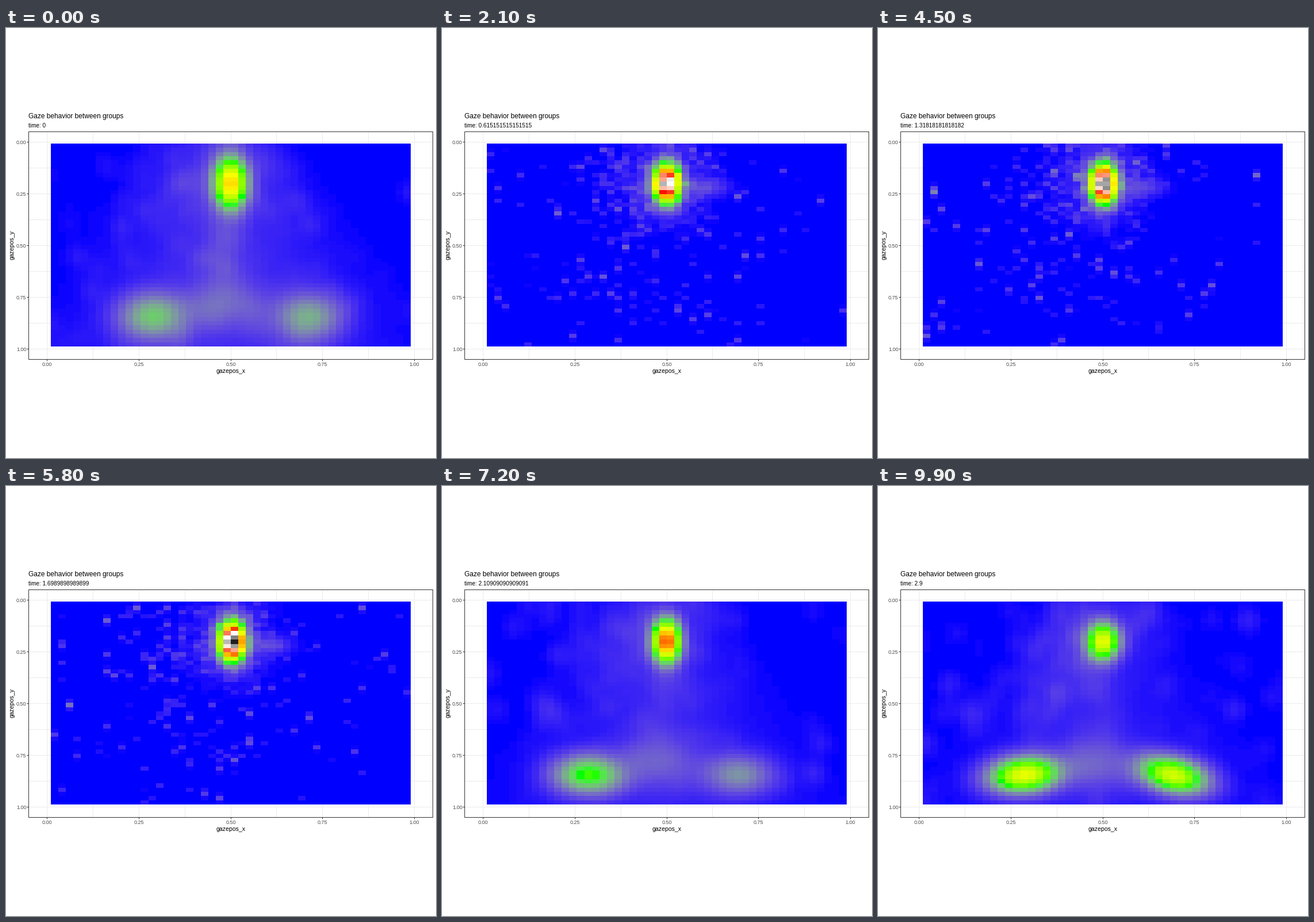
Recreate the animation shown at these times as a matplotlib script. Size 748 by 748 pixels, loop 10000 ms.

```python
import numpy as np
import matplotlib.pyplot as plt
from matplotlib.animation import FuncAnimation
from matplotlib.colors import ListedColormap, to_rgb

SIZE, FRAMES, N = 748, 100, 48
T_END = 2.9
plt.rcParams["font.family"] = "Liberation Sans"

# ---- palette: stops blended in CIE Lab --------------------------------
XYZ = np.array([[.4124564, .3575761, .1804375],
                [.2126729, .7151522, .0721750],
                [.0193339, .1191920, .9503041]])
WHITE = XYZ.sum(axis=1)
STOPS = ["blue", "lime", "yellow", "red", "white", "black"]


def rgb_to_lab(rgb):
    rgb = np.asarray(rgb)
    lin = np.where(rgb > .04045, ((rgb + .055) / 1.055) ** 2.4, rgb / 12.92)
    t = XYZ @ lin / WHITE
    fx, fy, fz = np.where(t > .008856, np.cbrt(t), 7.787 * t + 16 / 116)
    return [116 * fy - 16, 500 * (fx - fy), 200 * (fy - fz)]


def lab_to_rgb(lab):
    fy = (lab[:, 0] + 16) / 116
    f = np.stack([fy + lab[:, 1] / 500, fy, fy - lab[:, 2] / 200], axis=1)
    t = np.where(f > .206893, f ** 3, (f - 16 / 116) / 7.787)
    lin = np.clip((t * WHITE) @ np.linalg.inv(XYZ).T, 0, 1)
    return np.where(lin > .0031308, 1.055 * lin ** (1 / 2.4) - .055, 12.92 * lin)


def heat_map(steps=1024):
    labs = np.array([rgb_to_lab(to_rgb(s)) for s in STOPS])
    x, spots = np.linspace(0, 1, steps), np.linspace(0, 1, len(STOPS))
    ramp = np.stack([np.interp(x, spots, channel) for channel in labs.T], axis=1)
    return ListedColormap(np.clip(lab_to_rgb(ramp), 0, 1))


# ---- gaze density ------------------------------------------------------
rng = np.random.default_rng(12)
idx = np.arange(N)
R, C = np.meshgrid(idx, idx, indexing="ij")
phase = rng.uniform(0, 2 * np.pi, (N, N))


def scatter(n, col, row, gain, start):
    """Short fixations as rows of column, row, strength and moment."""
    power = gain * (.006 + rng.exponential(.016, n))
    return np.stack([np.round(col), np.round(row), power, start * (FRAMES + 10) - 5])


points = np.concatenate([
    scatter(2000, rng.normal(22, 5, 2000), rng.normal(7, 6, 2000), 1,
            rng.uniform(size=2000)),
    scatter(1400, rng.normal(19.5, 6, 1400), rng.normal(27, 12, 1400), 1,
            rng.beta(.6, .6, 1400)),
    scatter(800, N * rng.uniform(size=800) ** 1.25, rng.uniform(0, N, 800), 1.3,
            rng.uniform(size=800)),
], axis=1)
points = points[:, np.all((points[:2] >= 0) & (points[:2] < N), axis=0)]
col, row = points[:2].astype(int)
power, start = points[2:]


def ease(i, a, b):
    u = np.clip((i - a) / (b - a), 0, 1)
    return u * u * (3 - 2 * u)


def path(i, *keys):
    return np.interp(i, *zip(*keys))


def blob(c, r, w, h, slope=0):
    dc = C - c
    return np.exp(-(dc / w) ** 2 / 2 - ((R - r - slope * dc) / h) ** 2 / 2)


def blur(sigma):
    k = np.exp(-((idx[:, None] - idx) / sigma) ** 2 / 2)
    return k / k.sum(axis=1, keepdims=True)


def fixations(i, spread):
    z = np.zeros((N, N))
    np.add.at(z, (row, col), power * np.clip(1 - abs(i - start) / 5, 0, 1))
    smooth = blur(.45 + 1.4 * spread) @ z @ blur(.25 + .75 * spread).T
    return (1 + .7 * spread) * smooth


def gathered(i):
    """Everyone looks at the face: one tall, narrow peak."""
    peak = path(i, (10, .84), (58, .98))
    drift = .18 * ease(i, 30, 58)
    z = peak * blob(23.5 + drift, 9, 1.08, 2.8) * (1 + .05 * np.sin(phase + .3 * i))
    z += .02 * blob(23.5, 8, 3, 6) * (1 + .6 * np.sin(3 * phase + .2 * i))
    return z + .035 * blob(28.5, 9.8, 1.8, 1.3)


def shared(i):
    """Gaze split between the face and the two lower targets."""
    tilt = ease(i, 72, 99)
    low = 3.6 - .01 * i
    haze = 1 - .6 * i / FRAMES
    z = path(i, (0, .43), (60, .66), (99, .36)) * blob(
        23.5, 8.9, path(i, (0, 1.4), (70, 1.15), (99, 1.4)),
        path(i, (0, 3.8), (70, 3.2), (99, 2.8)))
    z += path(i, (0, .13), (72, .2), (99, .36)) * blob(13, 40.5, 2.9, low, -.12 * tilt)
    z += path(i, (0, .11), (72, .085), (99, .33)) * blob(34 - i / 99, 40.6, 2.8, low, .3 * tilt)
    z += .035 * blob(22.5, 36.5, 3, 3.6)
    z += haze * .014 * np.exp(-((C - 23) / (4 + .17 * R)) ** 2 / 2)
    z += haze * .012 * blob(22.8, 24, 1.8, 8)
    return z + .016 * np.exp(-((R - 39.5) / 3.5) ** 2 / 2 - ((C - 23) / 13) ** 4)


def density(i):
    spread = 1 - ease(i, 7, 17) + ease(i, 59, 69)
    z = spread * shared(i) + (1 - spread) * gathered(i)
    return np.clip(z + fixations(i, spread), 0, 1)


# ---- chart -------------------------------------------------------------
fig = plt.figure(figsize=(SIZE / 100, SIZE / 100), dpi=100, facecolor="white")
ax = fig.add_axes([0, 0, 1, 1])
ax.axis("off")

LEFT, RIGHT, TOP, BOTTOM = 39.5, 742.5, 179.5, 575.5
GRID, INK, GREY = "#ebebeb", "#333333", "#4d4d4d"


def px(x):
    return 71.5 + 639 * x


def py(y):
    return 197.4 + 360.2 * y


def line(x, y, color, z=1):
    ax.plot(x, y, color=color, lw=.72, zorder=z, solid_capstyle="butt")


def label(x, y, text, size, color="black", **kw):
    return ax.text(x, y, text, fontsize=size * .72, color=color,
                   va="baseline", zorder=5, **kw)


for k in range(9):
    v = k / 8
    x, y = np.floor(px(v)) + .5, np.floor(py(v)) + .5
    line([x, x], [TOP, BOTTOM], GRID)
    line([LEFT, RIGHT], [y, y], GRID)
    if k % 2 == 0:
        line([x, x], [BOTTOM, BOTTOM + 3], INK, 4)
        line([LEFT - 3, LEFT], [y, y], INK, 4)
        label(x, 588, f"{v:.2f}", 9, GREY, ha="center")
        label(35.5, y + 4, f"{v:.2f}", 9, GREY, ha="right")

line([LEFT, RIGHT, RIGHT, LEFT, LEFT], [TOP, TOP, BOTTOM, BOTTOM, TOP], INK, 4)
label(39, 157, "Gaze behavior between groups", 11.9)
clock = label(39, 173, "", 10)
label(391, 600, "gazepos_x", 10.5, ha="center")
label(14, 377, "gazepos_y", 10.5, ha="center", rotation=90, rotation_mode="anchor")

heat = ax.imshow(np.zeros((N, N)), cmap=heat_map(), vmin=0, vmax=1, aspect="auto",
                 interpolation="nearest", zorder=2, extent=(78, 704, 554, 201))
ax.set(xlim=(0, SIZE), ylim=(SIZE, 0))


def update(i):
    heat.set_data(density(i))
    clock.set_text(f"time: {i * T_END / (FRAMES - 1):.15g}")
    return heat, clock


anim = FuncAnimation(fig, update, frames=FRAMES, interval=100, repeat=True)
plt.show()
```
